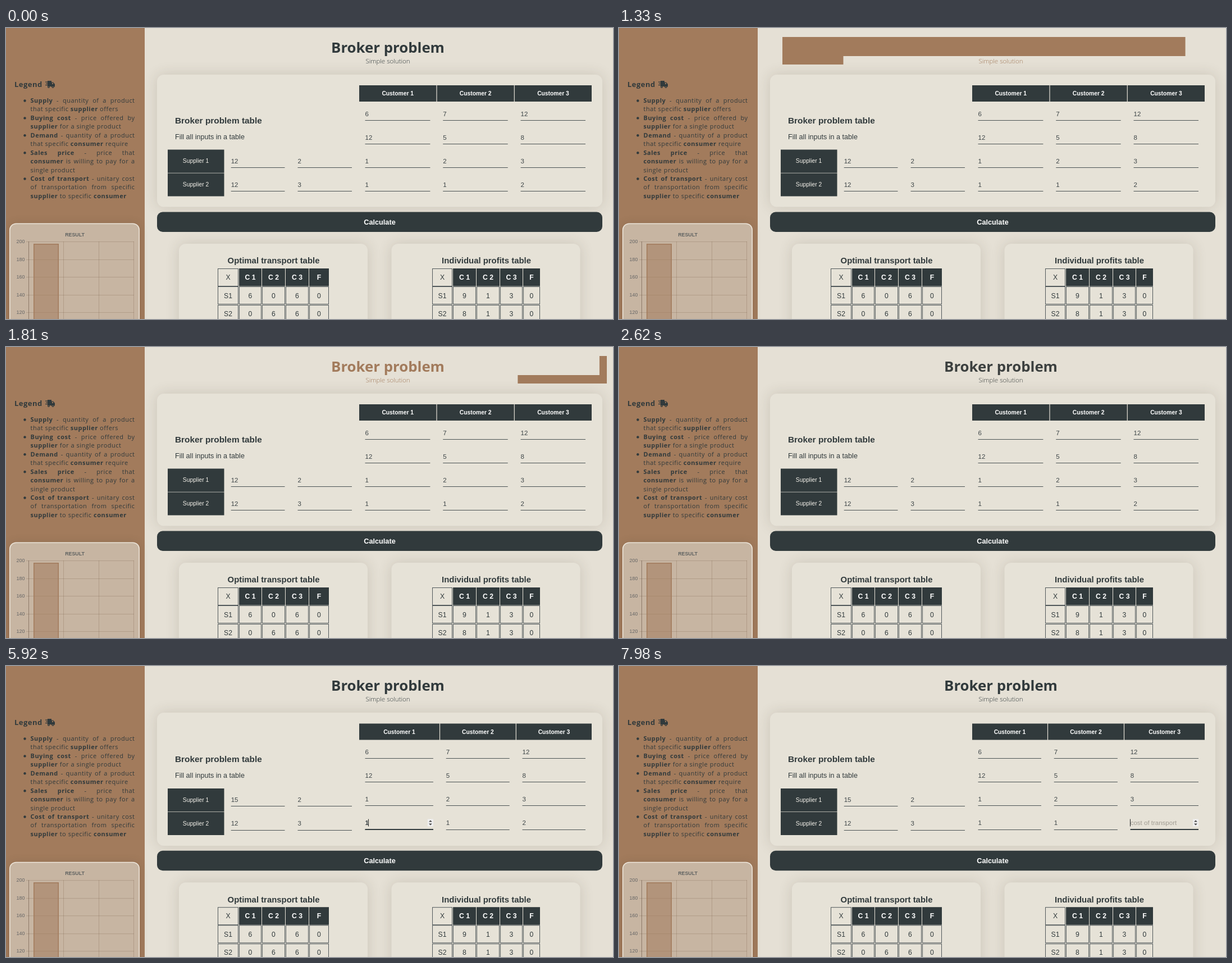
These frames come from a looping animation (1081 by 518 pixels, 8 s). An HTML page with a canvas:

```html
<!DOCTYPE html>
<html lang="en">
<head>
<meta charset="utf-8">
<title>Broker problem</title>
<style>
html, body { margin: 0; width: 100%; height: 100%; overflow: hidden; background: #e5e0d5; }
canvas { display: block; }
</style>
</head>
<body>
<canvas id="stage" width="1081" height="518"></canvas>
<script>
const ctx = document.getElementById('stage').getContext('2d');
const LOOP = 8000;
const DARK = [49, 58, 60], BROWN = [162, 123, 92];
const rgb = c => `rgb(${c.map(Math.round)})`;
const INK = rgb(DARK), CLAY = rgb(BROWN), PAPER = '#e6e2d7';
const SANS = '"Liberation Sans", Arial, sans-serif';
const HUMAN = '"Open Sans", "Noto Sans", sans-serif';

const LEGEND = [
  ['*Supply - quantity of a product', 'that specific *supplier offers'],
  ['*Buying *cost - price offered by', '*supplier for a single product'],
  ['*Demand - quantity of a product', 'that specific *consumer require'],
  ['*Sales *price - price that', '*consumer is willing to pay for a', 'single product'],
  ['*Cost *of *transport - unitary cost', 'of transportation from specific', '*supplier to specific *consumer']
];

// Timed states: [start, value]
const FOCUS = [[0, ''], [3010, 'supply'], [5800, 0], [6150, 1], [6480, 2]];
const SUPPLY = [[0, '12'], [3830, '1'], [3920, ''], [4820, '1'], [5050, '15']];
const COST = [[0, '2'], [7730, '']];
const CARET = [0, 3010, 3320, 3610, 3920, 4200, 4500, 4780, 5360, 5660,
  6780, 6870, 7170, 7460, 7730, 7780].map((time, i) => [time, i % 2 === 1]);

const at = (t, steps) => steps.filter(s => s[0] <= t).pop()[1];
const clamp = v => Math.min(1, Math.max(0, v));

function bezier(x1, y1, x2, y2) {
  const f = (a, b, s) => 3 * (1 - s) ** 2 * s * a + 3 * (1 - s) * s * s * b + s ** 3;
  return x => {
    x = clamp(x);
    let lo = 0, hi = 1;
    for (let i = 0; i < 24; i++) {
      const mid = (lo + hi) / 2;
      if (f(x1, x2, mid) < x) lo = mid; else hi = mid;
    }
    return f(y1, y2, hi);
  };
}
const ease = bezier(.25, .1, .25, 1);
const sweep = bezier(.75, .1, .15, .93);

function rect(x, y, w, h, color) {
  ctx.fillStyle = color;
  ctx.fillRect(x, y, w, h);
}

function frame(x, y, w, h, color) {
  ctx.strokeStyle = color;
  ctx.lineWidth = 1;
  ctx.strokeRect(x + .5, y + .5, w - 1, h - 1);
}

function panel(x, y, w, h, r, color, shadow = 0) {
  ctx.save();
  ctx.shadowColor = 'rgba(70, 55, 35, .16)';
  ctx.shadowBlur = shadow;
  ctx.fillStyle = color;
  ctx.beginPath();
  ctx.roundRect(x, y, w, h, r);
  ctx.fill();
  ctx.restore();
}

// y is the middle of the capital letters
function text(s, x, y, size, color = INK, weight = 400, align = 'left', family = SANS) {
  ctx.font = `${weight} ${size}px ${family}`;
  ctx.textAlign = align;
  ctx.fillStyle = color;
  ctx.fillText(s, x, y + size * .36);
}

function truck() {
  rect(74, 94, 7, 10, INK);
  rect(70, 95.5, 7, 1.2, INK);
  rect(71, 98.3, 6, 1.2, INK);
  rect(70, 101, 7, 1.2, INK);
  ctx.fillStyle = INK;
  ctx.beginPath();
  ctx.moveTo(80, 96.5);
  ctx.lineTo(84, 96.5);
  ctx.lineTo(87, 100);
  ctx.lineTo(87, 104.5);
  ctx.lineTo(80, 104.5);
  ctx.fill();
  rect(82, 97.7, 2, 2.2, CLAY);
  for (const x of [76, 83.5]) {
    ctx.beginPath();
    ctx.arc(x, 104.8, 2.1, 0, 7);
    ctx.fillStyle = INK;
    ctx.fill();
    ctx.beginPath();
    ctx.arc(x, 104.8, .8, 0, 7);
    ctx.fillStyle = CLAY;
    ctx.fill();
  }
}

function legendLine(line, y, justify) {
  const words = line.split(' ').map(w => ({ s: w.replace('*', ''), weight: w[0] === '*' ? 700 : 400 }));
  for (const w of words) {
    ctx.font = `${w.weight} 11px ${HUMAN}`;
    w.width = ctx.measureText(w.s).width;
  }
  const total = words.reduce((sum, w) => sum + w.width, 0);
  const gap = justify ? (186 - total) / (words.length - 1) : 3.4;
  let x = 43.5;
  for (const w of words) {
    text(w.s, x, y, 11, INK, w.weight, 'left', HUMAN);
    x += w.width + gap;
  }
}

function sidebar(drop) {
  rect(0, 0, 247, 518, CLAY);
  ctx.letterSpacing = '0.5px';
  text('Legend', 15, 100.5, 13, INK, 700, 'left', HUMAN);
  let y = 129;
  for (const item of LEGEND) {
    ctx.fillStyle = INK;
    ctx.beginPath();
    ctx.arc(33.5, y + .5, 2.2, 0, 7);
    ctx.fill();
    item.forEach((line, i) => {
      legendLine(line, y, i < item.length - 1);
      y += 15.45;
    });
  }
  ctx.letterSpacing = '0px';
  truck();

  ctx.save();
  ctx.translate(0, drop);
  panel(6, 347.5, 232, 220, 12, '#eee7dc', 16);
  panel(7.5, 349, 229, 220, 10.5, '#c7b5a2');
  text('RESULT', 122.5, 368, 8.8, '#5f6261', 700, 'center');
  const grid = 'rgba(90, 60, 35, .2)';
  for (let i = 0; i < 5; i++) {
    const ty = 380 + i * 31.5;
    text(200 - i * 20, 33.5, ty, 9, '#666', 400, 'right');
    rect(36, Math.round(ty), 192, 1, grid);
  }
  for (const x of [40, 102, 165, 227]) rect(x, 380, 1, 140, grid);
  rect(40, 380, 1, 140, 'rgba(60, 45, 30, .3)');
  rect(49, 384, 45, 140, 'rgba(162, 123, 92, .55)');
  ctx.strokeStyle = CLAY;
  ctx.lineWidth = 1.5;
  ctx.strokeRect(49.75, 384.75, 43.5, 140);
  ctx.restore();
}

function spinner(right, y) {
  rect(right - 10, y - 6.5, 10, 13, '#efefef');
  ctx.fillStyle = '#454545';
  for (const d of [-1, 1]) {
    ctx.beginPath();
    ctx.moveTo(right - 8, y + d * 1.6);
    ctx.lineTo(right - 2, y + d * 1.6);
    ctx.lineTo(right - 5, y + d * 4.4);
    ctx.fill();
  }
}

function input(value, x, right, y, line, o = {}) {
  rect(x, line, right - x, 1, '#4b5354');
  if (o.focus) rect(x, line - 1, right - x, 2, INK);
  if (o.focus || o.hover) spinner(right, y);
  text(value || o.hint || '', x, y, 11.5, value ? '#3c4446' : '#a19d93', o.bold ? 700 : 400);
  if (o.focus && o.caret) {
    const w = value ? ctx.measureText(value).width : -.6;
    rect(Math.round(x + w - .4), y - 6.5, 1, 13, '#1c2022');
  }
}

function brokerTable(t, focus, later) {
  const editing = focus === 'supply', caret = at(t, CARET);
  const down = later ? 1.5 : editing ? -.7 : 0;
  panel(269, 83, 793, later ? 237 : 235.5, 12, PAPER, 24);
  text('Broker problem table', 301, 164 + down, 15.4, INK, 700);
  text('Fill all inputs in a table', 301, 193.3 + down, 12.6);

  // Supplier side
  const wide = editing ? 501 : 496.5, second = editing ? 524 : 519.5;
  const tops = later ? [218, 260] : [editing ? 216 : 216.5, 258.5];
  const supply = [at(t, SUPPLY), '12'];
  for (let i = 0; i < 2; i++) {
    const shift = later ? 1 : 0;
    const y = (i ? 279 : 236.5) + shift - (editing && !i ? 1 : 0);
    const line = (i ? 290 : 248) + shift + (i && (editing || later) ? 1 : 0);
    rect(288, tops[i], 100.5, i ? 41 : 41.3, INK);
    text('Supplier ' + (i + 1), 338, (i ? 278.5 : 236.5) + (later ? 1.3 : 0), 10.3, '#f4f1ea', 400, 'center');
    input(supply[i], 400.7, wide, y, line, {
      focus: editing && !i, caret, hint: 'supply', hover: i && editing && t >= 5410
    });
    input(String(2 + i), second, 616, y, line);
  }

  // Customer side: the focused column takes a little more room
  const edges = [[629, 767, 905.3, 1043], [629, 772.5, 908.3, 1043],
    [629, 763.5, 908.3, 1043], [629, 763.5, 899.5, 1043]][later ? focus + 1 : 0];
  const rows = [['6', '7', '12'], ['12', '5', '8'], ['1', '2', '3'], ['1', '1', at(t, COST)]];
  const hover = t >= 6380 && t < 6780 ? [1, 2] : t >= 6080 && t < 6150 ? [1] : [];
  for (let c = 0; c < 3; c++) {
    const left = edges[c] + (c ? .6 : 0), right = edges[c + 1] - (c < 2 ? .6 : 0);
    rect(left, later ? 102.5 : 102, right - left, 29, INK);
    text('Customer ' + (c + 1), (left + right) / 2, later ? 117 : 116.5, 10.3, '#fff', 700, 'center');
    rows.forEach((row, r) => {
      const last = r === 3;
      input(row[c], left + (c ? 10.6 : 10.5), right - 11, [152.5, 194.8, 236.8, 279][r],
        164 + r * 42 + (later && last ? 1 : 0), {
          focus: last && focus === c, caret, hint: 'cost of transport',
          hover: last && hover.includes(c), bold: last && c === 0 && focus === 0
        });
    });
  }
}

function resultTable(title, cardX, cols, rows) {
  panel(cardX, 384, 336, 200, 12, PAPER, 24);
  const mid = (cols[0] + cols[5]) / 2;
  text(title, mid, 414, 14.9, INK, 700, 'center');
  [['X', 'C 1', 'C 2', 'C 3', 'F'], ...rows].forEach((row, r) => {
    row.forEach((cell, c) => {
      const x = cols[c], w = cols[c + 1] - x - 1, y = 428 + r * 32.5 | 0, head = !r && c;
      if (head) rect(x, y, w, 31.5, INK);
      else frame(x, y, w, 32, '#50585a');
      text(cell, x + w / 2, 443.7 + r * 32.5, 12.2, head ? '#fff' : INK, head ? 700 : 400, 'center');
    });
  });
}

function heading(t) {
  const k = t < 2370 ? ease((t - 800) / 570) : 1 - ease((t - 2370) / 400);
  const color = rgb(DARK.map((v, i) => v + (BROWN[i] - v) * k));
  text('Broker problem', 680, 35, 25.8, color, 700, 'center', HUMAN);
  text('Simple solution', 680, 58.5, 11.5, color, 300, 'center', HUMAN);
  for (const [y, h, start, time] of [[16, 34, 875, 1010], [50, 15, 1087, 1085]]) {
    const p = 2 * sweep((t - start) / time);
    const from = Math.max(0, p - 1), to = Math.min(1, p);
    rect(291 + from * 779, y, (to - from) * 779, h, CLAY);
  }
}

function draw() {
  const t = performance.now() % LOOP;
  const focus = at(t, FOCUS), later = typeof focus === 'number', drop = later ? 1.2 : 0;
  rect(0, 0, 1081, 518, '#e5e0d5');
  brokerTable(t, focus, later);
  ctx.save();
  ctx.translate(0, drop);
  panel(269, 327.5, 793, 35.5, 10, INK);
  text('Calculate', 665.5, 345, 12.7, '#fff', 700, 'center');
  resultTable('Optimal transport table', 308, [377, 415, 456, 498, 540, 576],
    [['S1', 6, 0, 6, 0], ['S2', 0, 6, 6, 0]]);
  resultTable('Individual profits table', 686.5, [759, 796, 838, 880, 921, 952],
    [['S1', 9, 1, 3, 0], ['S2', 8, 1, 3, 0]]);
  ctx.restore();
  sidebar(drop);
  heading(t);
  requestAnimationFrame(draw);
}
draw();
</script>
</body>
</html>
```
